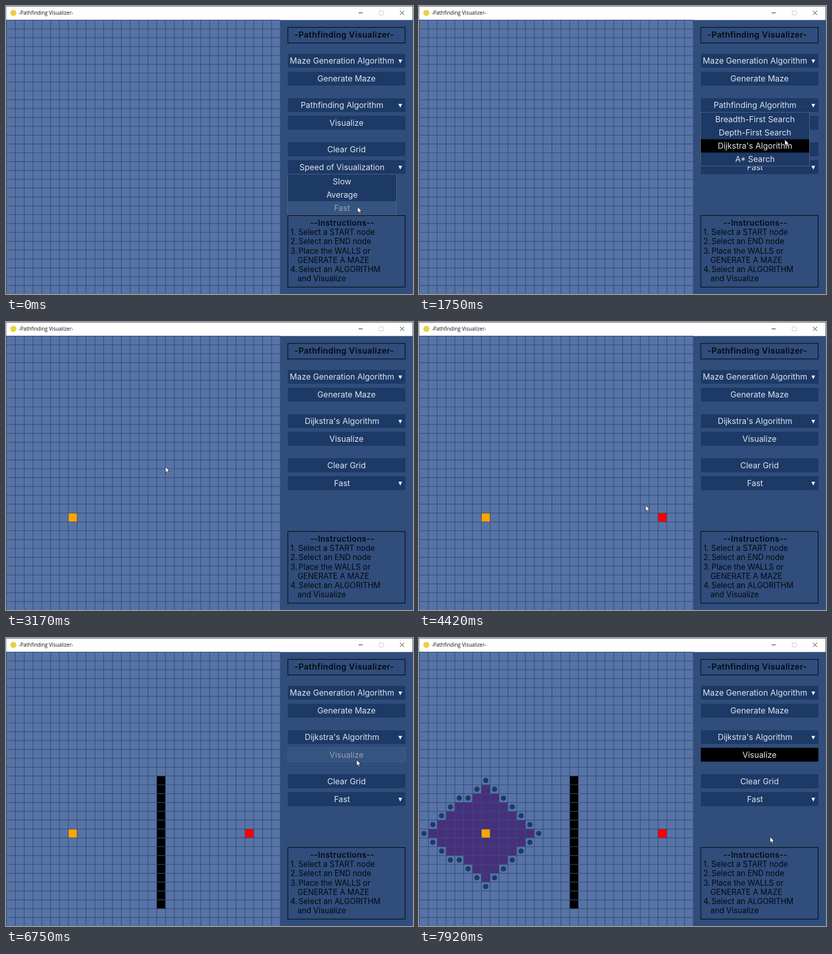
Recreate the animation shown at these times as an HTML page. Size 800 by 565 pixels, loop 8 s.

```html
<!DOCTYPE html>
<html lang="en">
<head>
<meta charset="utf-8">
<title>-Pathfinding Visualizer-</title>
<style>
  html, body { margin: 0; width: 100%; height: 100%; overflow: hidden; background: #304d7b; }
  svg { display: block; width: 800px; height: 565px; font-family: Inter, sans-serif; }
  .label { font-size: 15.9px; fill: #dfe4ec; text-anchor: middle; }
  .heading { font-weight: 600; letter-spacing: .5px; text-anchor: middle; }
  .steps { font-size: 15.2px; }
  .ink { fill: #05080d; }
  .frame { fill: none; stroke: #05080d; stroke-width: 1.2; }
</style>
</head>
<body>
<svg viewBox="0 0 800 565">
  <rect width="800" height="565" fill="#304d7b"/>
  <rect width="800" height="27.5" fill="#fff"/>
  <circle cx="14.5" cy="13.5" r="6" fill="#edcf45"/>
  <text x="25" y="17.3" font-size="10" font-family="Open Sans, sans-serif" fill="#111">-Pathfinding Visualizer-</text>
  <path d="M693 13.5h8M774.5 9.5l8 8M782.5 9.5l-8 8" stroke="#111" fill="none"/>
  <rect x="733.5" y="9.5" width="8" height="8" fill="none" stroke="#ccc"/>
  <rect x="1" y="27.5" width="538" height="538" fill="#5874a6"/>
  <g id="cells"></g>
  <path id="lines" stroke="#304d7b" stroke-width="1.2" fill="none"/>

  <rect class="frame" x="554" y="42" width="230.5" height="30.5"/>
  <text class="heading ink" x="665" y="62.3" font-size="16">-Pathfinding Visualizer-</text>
  <rect class="frame" x="554" y="411" width="230.5" height="140.5"/>
  <text class="heading ink" x="661" y="430.8" font-size="15.5">--Instructions--</text>
  <g class="steps ink" id="steps"></g>
  <g id="controls"></g>
  <path d="M0 0V541M0 .5H800M799.5 0V565M.5 27V565" stroke="#4b5668" fill="none"/>
  <path id="cursor" d="M0 0V11.6L2.7 9.1L4.6 13.4L6.5 12.6L4.6 8.4H8.3Z" fill="#fff" stroke="#111" stroke-width=".8"/>
</svg>
<script>
const $ = id => document.getElementById(id);
const LOOP = 8000, STEP = 1000 / 12;
const SIZE = 31, PITCH = 17.36, LEFT = 1, TOP = 27.6;
const START = [7, 20], END = [27, 20], WALL_COL = 17, WALL_TOP = 14;
const BUTTON = '#1d3966', HOVER = '#000', PRESSED = '#35547f';

// Cursor stops: time, x, y, easing of the way there.
const linear = p => p;
const smooth = p => p * p * (3 - 2 * p);
const easeIn = p => p ** 1.5;
const easeOut = p => 1 - (1 - p) ** 2;
const stops = [
  [0, 691, 394], [170, 691, 394], [760, 753, 197, smooth], [1090, 753, 197],
  [1750, 719, 262, smooth], [2080, 714, 268, smooth], [2500, 253, 392, easeIn],
  [2750, 132, 381, easeOut], [2920, 132, 381], [3170, 317, 282, easeIn],
  [3330, 366, 300, linear], [3750, 478, 379, easeOut], [4250, 478, 379],
  [4850, 304, 276, smooth], [5080, 304, 277], [5580, 311, 505, linear],
  [5710, 311, 521, easeOut], [5910, 311, 521], [6580, 689, 239, smooth],
  [6920, 689, 239], [7500, 690, 385, smooth], [7920, 690, 390, easeOut]
];

function cursorAt(t) {
  const i = stops.findIndex(s => s[0] > t);
  if (i < 0) return stops.at(-1).slice(1, 3);
  const [t0, x0, y0] = stops[i - 1], [t1, x1, y1, ease = linear] = stops[i];
  const p = ease((t - t0) / (t1 - t0));
  return [x0 + (x1 - x0) * p, y0 + (y1 - y0) * p];
}

const between = (t, a, b) => t >= a && t < b;
const rect = (x, y, w, h, fill, more = '') =>
  `<rect x="${x}" y="${y}" width="${w}" height="${h}" fill="${fill}" ${more}/>`;
const label = (x, y, text, pressed) =>
  `<text class="label" x="${x}" y="${y + 5.7}"${pressed ? ' style="fill:#95a1b1"' : ''}>${text}</text>`;

// Search order: by distance, then column, then row.
const distance = ([c, r]) => Math.abs(c - START[0]) + Math.abs(r - START[1]);
const order = Array.from({ length: SIZE * SIZE }, (_, i) => [Math.floor(i / SIZE), i % SIZE])
  .sort((a, b) => distance(a) - distance(b) || a[0] - b[0] || a[1] - b[1]);

const cell = ([c, r], fill) => rect(LEFT + c * PITCH, TOP + r * PITCH, PITCH, PITCH, fill);
const dot = ([c, r]) =>
  `<circle cx="${LEFT + (c + .5) * PITCH}" cy="${TOP + (r + .5) * PITCH}" r="5.1" fill="#1d3966"/>`;

function drawCells(t, cursorY) {
  let out = '';
  const visited = order.slice(0, Math.max(0, Math.floor((t - 6945) * .0692)));
  const seen = new Set(visited.map(String));
  const frontier = new Map();
  for (const [c, r] of visited)
    for (const next of [[c - 1, r], [c + 1, r], [c, r - 1], [c, r + 1]])
      if (next[0] >= 0 && !seen.has(String(next))) frontier.set(String(next), next);
  out += visited.map(v => cell(v, '#482f7b')).join('');
  out += [...frontier.values()].map(dot).join('');
  if (t >= 2825) out += cell(START, '#ffa500');
  if (t >= 3900) out += cell(END, '#f00');
  if (t >= 5080) {
    const last = t < 5700 ? Math.floor((cursorY - TOP) / PITCH) : 28;
    for (let r = WALL_TOP; r <= last; r++) out += cell([WALL_COL, r], '#000');
  }
  return out;
}

function drawControls(t, [cx, cy]) {
  const speedOpen = t < 160, pathOpen = between(t, 1080, 2080);
  const searching = t >= 6840;
  const under = (x, y, w, h) => cx >= x && cx < x + w && cy >= y && cy < y + h;
  const covered = pathOpen && under(553, 208, 215, 105);

  function button(y, text, dropdown, pressed, held) {
    const w = dropdown ? 212.5 : 231;
    const hover = held || !searching && !covered && under(554, y, w, 27);
    const fill = pressed ? PRESSED : hover ? HOVER : BUTTON;
    const edge = pressed ? 'stroke="#40609a"' : '';
    let out = rect(554, y, 231, 27, BUTTON) + rect(554, y, w, 27, fill, edge);
    if (dropdown) {
      if (!searching && !covered && under(767, y, 18, 27)) out += rect(767, y, 18, 27, HOVER);
      out += `<path d="M771.4 ${y + 11}h7.2l-3.6 7.2z" fill="#fff"/>`;
    }
    return out + label(dropdown ? 660.5 : 669.3, y + 13.7, text, pressed);
  }

  function menu(y, options, pressed) {
    let out = rect(553.5, y, 214, options.length * 26 + 1.5, BUTTON, 'stroke="#58647c"');
    options.forEach((text, i) => {
      const top = y + 1 + i * 26, hover = under(554, top, 213, 26);
      if (hover) out += rect(554, top, 213, 26, pressed ? PRESSED : HOVER);
      out += label(660.5, top + 13, text, hover && pressed);
    });
    return out;
  }

  let out = button(94, 'Maze Generation Algorithm', true)
    + button(129, 'Generate Maze')
    + button(181, t < 2080 ? 'Pathfinding Algorithm' : "Dijkstra's Algorithm", true, between(t, 990, 1080))
    + button(215.5, 'Visualize', false, between(t, 6700, 6840), searching)
    + button(267.5, 'Clear Grid')
    + button(302.5, speedOpen ? 'Speed of Visualization' : 'Fast', true);
  if (speedOpen) out += menu(330, ['Slow', 'Average', 'Fast'], true);
  if (pathOpen) out += menu(208.5,
    ['Breadth-First Search', 'Depth-First Search', "Dijkstra's Algorithm", 'A* Search'], t >= 1990);
  return out;
}

let lines = '';
for (let i = 0; i <= SIZE; i++) {
  const x = LEFT + i * PITCH, y = TOP + i * PITCH;
  lines += `M${x} ${TOP}V565M${LEFT} ${y}H539`;
}
$('lines').setAttribute('d', lines);

$('steps').innerHTML = [
  ['1.', 'Select a START node', 574.5], ['2.', 'Select an END node', 575],
  ['3.', 'Place the WALLS or', 575], ['', 'GENERATE A MAZE', 573],
  ['4.', 'Select an ALGORITHM', 575], ['', 'and Visualize', 573]
].map(([number, text, x], i) => {
  const y = 449 + i * 18.25;
  return `<text x="559" y="${y}">${number}</text><text x="${x}" y="${y}">${text}</text>`;
}).join('');

let shown = -1;
function tick(now) {
  const step = Math.floor((now % LOOP + 4) / STEP) % 96;
  if (step !== shown) {
    shown = step;
    const t = step * STEP, [x, y] = cursorAt(t);
    $('cells').innerHTML = drawCells(t, y);
    $('controls').innerHTML = drawControls(t, [x, y]);
    $('cursor').setAttribute('transform', `translate(${x} ${y})`);
  }
  requestAnimationFrame(tick);
}
tick(performance.now());
</script>
</body>
</html>
```
